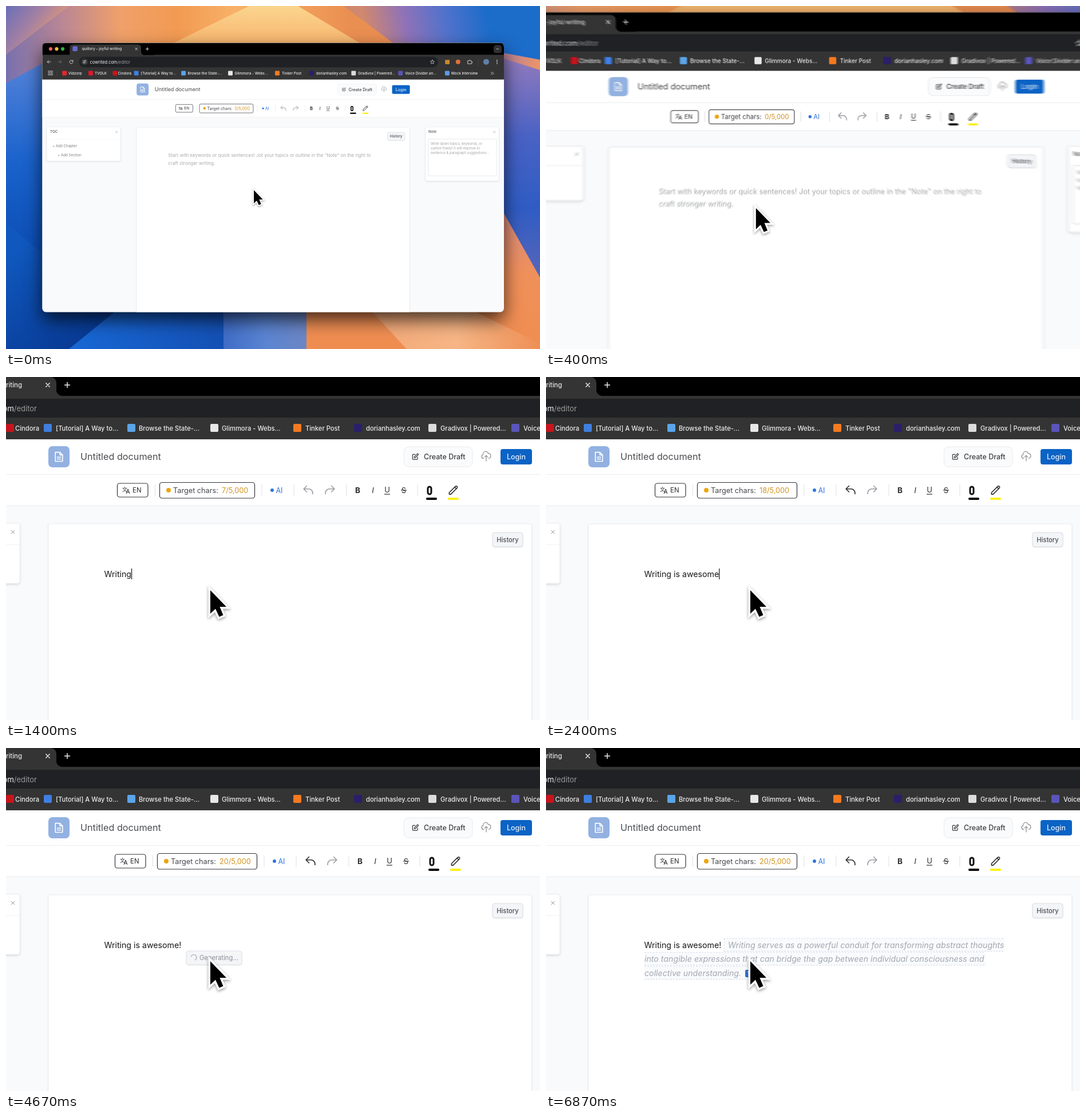
An HTML page with a canvas that plays this animation: 933x600 px, repeating every 6940 ms.

```html
<!DOCTYPE html>
<html lang="en">
<head>
<meta charset="utf-8">
<style>
html, body { margin: 0; width: 100%; height: 100%; overflow: hidden; background: #1257c4; }
canvas { display: block; width: 933px; height: 600px; }
</style>
</head>
<body>
<canvas id="stage" width="933" height="600"></canvas>
<script>
const LOOP = 6940, ZOOM = 1.77, CX = 428.5, CY = 154.5, SHUTTER = 18;
const TYPED = 'Writing is awesome! ';
const out = document.getElementById('stage').getContext('2d');
const layer = document.createElement('canvas');
layer.width = 933;
layer.height = 600;
const sceneCtx = layer.getContext('2d');
const INK = '#2b2d31', CHROME = '#343434', BODY = 14.2;
let c = sceneCtx; // context the helpers draw on
let k = 1; // scene scale, 1 when fully zoomed in

// Critically damped spring from 0 to 1
function spring(t, start, w) {
  const x = Math.max(0, t - start) * w;
  return 1 - (1 + x) * Math.exp(-x);
}

function text(s, x, y, size, color, weight = 400, align = 'left') {
  c.font = `${weight} ${size}px Inter, sans-serif`;
  c.textAlign = align;
  c.fillStyle = color;
  c.fillText(s, x, y + size * 0.364);
}

function box(x, y, w, h, r, fill, stroke, shadow = 0, line = 1) {
  c.beginPath();
  c.roundRect(x, y, w, h, r);
  c.save();
  if (shadow) {
    c.shadowColor = 'rgba(0,0,0,.16)';
    c.shadowBlur = shadow * k;
    c.shadowOffsetY = shadow * k / 3;
  }
  if (fill) { c.fillStyle = fill; c.fill(); }
  c.restore();
  if (stroke) { c.strokeStyle = stroke; c.lineWidth = line; c.stroke(); }
}

function dot(x, y, r, color) {
  c.beginPath();
  c.arc(x, y, r, 0, 7);
  c.fillStyle = color;
  c.fill();
}

function rule(x1, y1, x2, y2, color, w = 1) {
  c.beginPath();
  c.moveTo(x1, y1);
  c.lineTo(x2, y2);
  c.strokeStyle = color;
  c.lineWidth = w;
  c.stroke();
}

// Stroked icon on a 24-unit grid, centred on x, y
function icon(d, x, y, size, color, w = 2) {
  c.save();
  c.translate(x - size / 2, y - size / 2);
  c.scale(size / 24, size / 24);
  c.strokeStyle = color;
  c.lineWidth = w;
  c.lineCap = c.lineJoin = 'round';
  c.stroke(new Path2D(d));
  c.restore();
}

const ICON = {
  back: 'M21 12H3M11 4l-8 8 8 8',
  forward: 'M3 12h18M13 4l8 8-8 8',
  reload: 'M20 8a9 9 0 1 0 1 6M21 3v6h-6',
  close: 'M5 5l14 14M19 5 5 19',
  plus: 'M12 3v18M3 12h18',
  down: 'M5 9l7 7 7-7',
  more: 'M4 5l7 7-7 7M13 5l7 7-7 7',
  star: 'M12 2l3 7 7 .6-5.4 4.8 1.7 7.2L12 18l-6.3 3.6 1.7-7.2L2 9.6 9 9z',
  tune: 'M3 7h8M17 7h4M3 17h3M12 17h9M17 7a3 3 0 1 1-6 0 3 3 0 1 1 6 0M12 17a3 3 0 1 1-6 0 3 3 0 1 1 6 0',
  puzzle: 'M4 7h5a3 3 0 1 1 6 0h5v5a3 3 0 1 1 0 5v4H4z',
  doc: 'M6 2h8l6 6v14H4V2zM14 2v6h6M8 13h8M8 17h8',
  edit: 'M11 5H6a2 2 0 0 0-2 2v11a2 2 0 0 0 2 2h11a2 2 0 0 0 2-2v-5M17.6 3.6a2 2 0 1 1 2.8 2.8L11.8 15H9v-2.8z',
  cloud: 'M7 16a4 4 0 0 1-.9-7.9A5 5 0 1 1 15.9 6H16a5 5 0 0 1 1 9.9M15 13l-3-3-3 3M12 10v11',
  undo: 'M3 10h10a8 8 0 0 1 8 8v2M3 10l6 6M3 10l6-6',
  redo: 'M21 10H11a8 8 0 0 0-8 8v2M21 10l-6 6M21 10l-6-6',
  pen: 'M15.2 5.2l3.6 3.6M16.7 3.7a2.5 2.5 0 1 1 3.6 3.6L6.5 21H3v-3.6z'
};

// Gradient polygon: direction x1,y1,x2,y2, colours, flat point list
function ray(dir, colors, pts) {
  const g = c.createLinearGradient(...dir);
  colors.forEach((col, i) => g.addColorStop(i / (colors.length - 1), col));
  c.beginPath();
  for (let i = 0; i < pts.length; i += 2) c.lineTo(pts[i], pts[i + 1]);
  c.fillStyle = g;
  c.fill();
}

function wallpaper() {
  c.save();
  c.translate(CX, CY);
  c.scale(ZOOM, ZOOM);
  c.translate(-CX, -CY);
  // left and bottom blues
  ray([0, 110, 0, 600], ['#4f80d8', '#1a62cc', '#0b4db4', '#0a479f'], [0, 0, 933, 0, 933, 600, 0, 600]);
  ray([0, 440, 120, 600], ['#1058be', '#083a94'], [0, 380, 190, 535, 110, 600, 0, 600]);
  ray([130, 0, 380, 0], ['#1766d2', '#1450b4'], [190, 535, 380, 535, 380, 600, 110, 600]);
  // warm top, fading to violet and blue on the right
  ray([0, 0, 600, 0], ['#7770ae', '#bb8794', '#f0a06a', '#f29a52', '#f8b168', '#f3a15c', '#ea8f52'],
    [0, 0, 700, 0, 740, 70, 64, 100, 0, 135]);
  ray([0, 0, 80, 60], ['#6a6fb8', '#a07fa4', '#e39a78'], [0, 0, 110, 0, 0, 85]);
  ray([0, 0, 0, 65], ['#fbd58e', '#f7b66f'], [425, 0, 510, 0, 620, 66, 290, 66]);
  ray([620, 0, 830, -40], ['#d0886e', '#8f72b8', '#4f72cc', '#1c6cca'], [590, 0, 933, 0, 933, 110, 690, 75]);
  // right edge and bottom right
  ray([0, 100, 0, 480], ['#8c78bd', '#4a62c4', '#2f5cc4', '#5a66b8'], [860, 90, 933, 106, 933, 500, 860, 380]);
  ray([870, 80, 933, 110], ['#b5809c', '#f09562'], [869, 82, 933, 94, 933, 112, 869, 92]);
  ray([0, 340, 0, 600], ['#d58a86', '#f0905a', '#ef8d50'], [860, 345, 933, 475, 933, 600, 525, 600, 525, 530, 860, 530]);
  ray([640, 0, 933, 0], ['#f3a877', '#f6b585', '#ee8f55'], [640, 535, 820, 535, 933, 590, 933, 600, 700, 600]);
  ray([380, 0, 525, 0], ['#3f6cc6', '#5a84d2', '#6d86c4'], [380, 530, 525, 530, 525, 600, 380, 600]);
  c.restore();
}

// icon x, label x, colour, label
const BOOKMARKS = [
  [-149, -137, '#e8262b', 'Vidzorp'],
  [-68, -55.5, '#e0182d', 'TVOLK'],
  [7, 16, '#c8141c', 'Cindora'],
  [73, 87, '#3f7fe0', '[Tutorial] A Way to...'],
  [219, 232, '#5aa4e8', 'Browse the State-...'],
  [364, 377, '#e8e8e8', 'Glimmora - Webs...'],
  [509, 523, '#f47a20', 'Tinker Post'],
  [615, 629, '#2a1f6b', 'dorianhasley.com'],
  [745, 759, '#dcdcdc', 'Gradivox | Powered...'],
  [890, 904, '#5a55b8', 'Voice Divider an...'],
  [1034.5, 1047, '#5a9be8', 'Mock Interview']
];

function browser() {
  c.fillStyle = '#000';
  c.fillRect(-218, -5, 1428, 38);
  ['#f4605a', '#f6bd3b', '#2fb344'].forEach((col, i) => dot(-192 + i * 18.7, 14, 5.5, col));
  c.fillStyle = CHROME;
  c.fillRect(-218, 33, 1428, 76);
  box(-133, 0, 221, 44, 10, CHROME);
  c.fillRect(80, 25, 16, 9);
  box(88, 4, 40, 29, [0, 0, 0, 10], '#000');
  box(-124, 6, 15, 15, 3, '#6a68cf');
  text('quillory – joyful writing', 28, 14, 11.4, '#e4e4e4', 500, 'right');
  icon(ICON.close, 73, 14, 11, '#eee', 3);
  icon(ICON.plus, 107, 14, 12, '#eee', 3);
  box(1178, 2, 25, 25, 8, '#303030');
  icon(ICON.down, 1190, 14, 12, '#ddd', 3);

  box(-104, 38, 1110, 33, 16, '#202124');
  icon(ICON.back, -197, 54, 14, '#ddd', 2.6);
  icon(ICON.forward, -163.5, 54, 14, '#777', 2.6);
  icon(ICON.reload, -128, 54, 14, '#ddd', 2.6);
  dot(-87, 54, 11, CHROME);
  icon(ICON.tune, -87, 54, 13, '#ddd', 2.4);
  text('cowrited.com', -70, 55, 13, '#f0f0f0');
  const w = c.measureText('cowrited.com').width;
  text('/editor', -70 + w, 55, 13, '#9a9a9a');
  icon(ICON.star, 988.5, 54, 15, '#ddd', 2);
  box(1028, 48, 14, 13, 2, '#c98a2e');
  dot(1068, 54, 7, '#e0703f');
  icon(ICON.puzzle, 1104, 54, 16, '#ddd', 2.4);
  rule(1130, 44, 1130, 64, '#555');
  dot(1155, 54, 9, '#5f7fa8');
  for (let i = -1; i < 2; i++) dot(1188.5, 54 + i * 5, 1.6, '#ddd');

  for (let i = 0; i < 4; i++) box(-199 + (i % 2) * 8, 82 + (i >> 1) * 8, 5, 5, 0, null, '#ccc', 0, 1.4);
  rule(-172, 80, -172, 98, '#555');
  for (const [ix, tx, col, label] of BOOKMARKS) {
    box(ix - 7, 82, 14, 14, 2, col);
    text(label, tx, 89.5, 11.2, '#ececec', 500);
  }
  icon(ICON.more, 1174, 89.5, 13, '#ddd', 2.6);
}

function header() {
  c.fillStyle = '#fff';
  c.fillRect(-218, 109, 1428, 116);
  rule(-218, 170.5, 1210, 170.5, '#e9ebee');
  rule(-218, 225, 1210, 225, '#e9ebee');
  box(74, 121, 37, 37, 7, '#92b1e1');
  icon(ICON.doc, 92.5, 139.5, 19, '#fff', 2);
  text('Untitled document', 130, 139.5, 16.2, '#4a4c50');
  box(695.5, 122, 119.5, 35, 8, '#fafbfc', '#e6e9ed');
  icon(ICON.edit, 715, 139.5, 14, '#333', 2);
  text('Create Draft', 730, 139.5, 12.5, '#3c3e42', 500);
  icon(ICON.cloud, 839, 139, 21, '#999', 1.6);
  box(864, 126, 55, 27, 4, '#0b63c5');
  text('Login', 891.5, 139.5, 12.5, '#e8f1fc', 500, 'center');
}

function toolbar(count, undoable) {
  const d = count < 10 ? 4 : 0, y = 198;
  const bar = x => rule(x, 188, x, 208, '#dcdfe3');
  c.save();
  c.translate(d, 0);
  box(190.5, 186, 53.5, 24, 4, '#fff', '#33353a', 0, 1.2);
  c.font = '9px "Noto Sans CJK SC", "Noto Sans CJK JP", sans-serif';
  c.textAlign = 'left';
  c.fillStyle = INK;
  c.fillText('文', 199, 200);
  text('A', 205.5, 200, 10, INK, 500);
  text('EN', 217, y, 11.5, INK);
  bar(256.5);
  c.restore();
  box(264.5 + d, 184.5, 174 - 2 * d, 27.5, 4, '#fff', '#33353a', 0, 1.2);
  dot(280 + d, y, 4, '#eda512');
  text('Target chars:', 288 + d, y, 12.7, '#44464b');
  text(count + '/5,000', 373 + d, y, 12.7, '#d2921e');
  c.save();
  c.translate(-d, 0);
  bar(451);
  dot(469, y, 3, '#2f74dc');
  text('AI', 475.5, y, 12.5, '#2f74dc');
  bar(507);
  icon(ICON.undo, 532, y - 0.5, 21, undoable ? INK : '#9a9da2', 1.9);
  icon(ICON.redo, 570, y - 0.5, 21, '#9a9da2', 1.9);
  bar(599);
  text('B', 618.5, y, 13.5, INK, 700, 'center');
  text('I', 645, y, 13.5, INK, 'italic 400', 'center');
  text('U', 670, y - 1, 13, INK, 400, 'center');
  rule(665, 205, 675, 205, INK, 1.2);
  text('S', 699, y, 13, INK, 400, 'center');
  rule(694, y, 704, y, INK, 1.2);
  bar(723);
  box(741, 192, 6, 13, 3, null, '#111', 0, 3);
  box(738, 211, 19, 4, 2, '#000');
  icon(ICON.pen, 785.5, y, 19, INK, 2);
  box(776, 211, 19, 4, 2, '#fbf010');
  c.restore();
}

function panels() {
  box(-204, 256, 228, 105, 4, '#fff', '#f0f1f3', 5);
  text('TOC', -193.5, 270.5, 11, '#555', 500);
  icon(ICON.close, 12, 271, 10, '#999', 2.4);
  rule(-204, 293, 24, 293, '#eff0f2');
  text('+ Add Chapter', -186.5, 313.5, 11, '#7b7e84');
  text('+ Add Section', -170.5, 342, 11, '#7b7e84');

  box(967.5, 256, 226.5, 166.5, 4, '#fff', '#f0f1f3', 5);
  text('Note', 976.5, 270.5, 11, '#555', 500);
  icon(ICON.close, 1180.5, 271, 10, '#999', 2.4);
  box(976, 293, 211, 114, 3, '#fff', '#d5d7db');
  ['Write down topics, keywords, or', 'outline freely! It will improve AI', 'sentence & paragraph suggestions...']
    .forEach((s, i) => text(s, 983.5, 306.5 + i * 15, 10.5, '#a3a5a9'));
}

function suggestion() {
  const lines = [
    [311, 318, 801, 'Writing serves as a powerful conduit for transforming abstract thoughts'],
    [172, 172, 768, 'into tangible expressions that can bridge the gap between individual consciousness and'],
    [172, 172, 372, 'collective understanding.']
  ];
  lines.forEach(([x, tx, end, s], i) => {
    const y = 344.5 + i * 24.5;
    c.fillStyle = '#f8fafc';
    c.fillRect(x, y - 11, end - x, 22);
    c.setLineDash([3, 2]);
    rule(x, y - 11.5, end, y - 11.5, '#d5dfea');
    rule(x, y + 11, end, y + 11, '#cddae8');
    if (!i) rule(x, y - 11, x, y + 11, '#d5dfea');
    c.setLineDash([]);
    text(s, tx, y, BODY, '#a3a8b1', 'italic 400');
  });
  box(348, 388, 22, 13, 2, '#2f70d2');
  text('Tab', 351, 394.5, 8.5, '#fff');
}

function page(t, count) {
  box(74, 257, 844.5, 640, 3, '#fff', '#eceef1', 3);
  box(850, 272, 53, 25, 4, '#f3f5f8', '#dadde2', 2);
  text('History', 876.5, 284.5, 11.2, '#4a4d52', 500, 'center');
  if (t < 450) {
    text('Start with keywords or quick sentences! Jot your topics or outline in the "Note" on the right to', 171.5, 343.5, BODY, '#a9abae');
    text('craft stronger writing.', 171.5, 367.5, BODY, '#a9abae');
  }
  const typed = TYPED.slice(0, count);
  text(typed, 171.5, 344.5, BODY, '#17181b');
  if (t > 700 && t < 3150) {
    const x = 172 + c.measureText(typed).width;
    rule(x, 335, x, 354, '#111', 1.2);
  }
  if (t >= 3150 && t < 5200) {
    box(315, 355, 97, 24, 4, '#f4f5f7', '#e2e4e8', 2);
    const a = (t - 3930) / 1000 * 2 * Math.PI - 1.2;
    c.beginPath();
    c.arc(328, 366.5, 5, a, a + 4);
    c.strokeStyle = '#a4a8af';
    c.lineWidth = 1.2;
    c.stroke();
    text('Generating...', 338, 366.5, 11.2, '#8b9098');
  }
  if (t >= 5200) suggestion();
}

function pointer(t) {
  const rest = 1 - spring(t, 70, 0.0155);
  c.save();
  c.translate(357 + 79.5 * rest, 373 + 78 * rest);
  const arrow = new Path2D('M0 0V41L9 32.5 15.5 46.5 22.5 43.5 16.5 29H28z');
  c.shadowColor = 'rgba(0,0,0,.4)';
  c.shadowBlur = 5 * k;
  c.shadowOffsetY = 2 * k;
  c.strokeStyle = '#fff';
  c.lineWidth = 7;
  c.stroke(arrow);
  c.shadowColor = 'transparent';
  c.fillStyle = '#000';
  c.fill(arrow);
  c.restore();
}

// Aims the helpers at a context, with the camera of time t
function aim(ctx, t) {
  c = ctx;
  k = (1 + (ZOOM - 1) * spring(t, 142, 0.0108)) / ZOOM;
  c.setTransform(k, 0, 0, k, CX * (1 - k), CY * (1 - k));
}

function scene(t) {
  aim(sceneCtx, t);
  const count = Math.max(0, Math.min(TYPED.length, Math.floor((t - 790) / 85)));
  wallpaper();
  c.save();
  c.shadowColor = 'rgba(0,0,0,.7)';
  c.shadowBlur = 55 * k;
  c.shadowOffsetY = 24 * k;
  box(-218, -5, 1428, 834, 12, '#f9fafb');
  c.restore();
  c.save();
  c.beginPath();
  c.roundRect(-218, -5, 1428, 834, 12);
  c.clip();
  browser();
  header();
  toolbar(count, t > 1900);
  panels();
  page(t, count);
  c.restore();
}

function frame(now) {
  const t = now % LOOP;
  const samples = t > 60 && t < 700 ? 10 : 1; // motion blur while the camera moves
  out.setTransform(1, 0, 0, 1, 0, 0);
  for (let i = 0; i < samples; i++) {
    scene(t + (samples > 1 ? (i / (samples - 1) - 0.5) * SHUTTER : 0));
    out.globalAlpha = 1 / (i + 1);
    out.drawImage(layer, 0, 0);
  }
  out.globalAlpha = 1;
  aim(out, t);
  pointer(t);
  requestAnimationFrame(frame);
}
requestAnimationFrame(frame);
</script>
</body>
</html>
```
